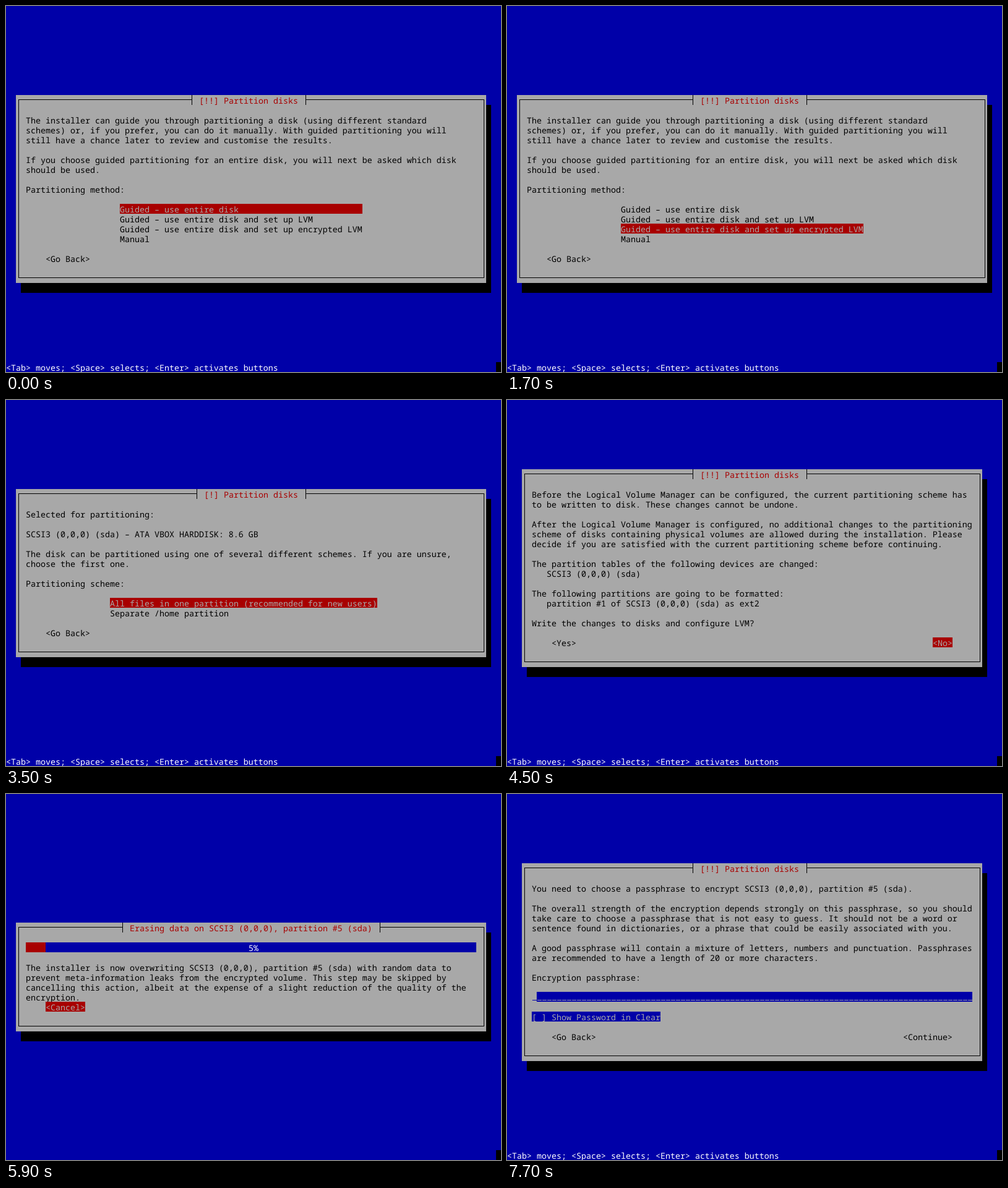
These frames come from a looping animation (800 px wide and 592 px high, 8000 ms). An HTML page:

```html
<!DOCTYPE html>
<html lang="en">
<head>
<meta charset="utf-8">
<title>Disk partitioning installer</title>
<style>
  html, body { margin: 0; width: 100%; height: 100%; overflow: hidden; background: #0000a8; }
  svg { display: block; width: 100vw; height: 100vh; }
  text {
    font: 300 13.3333px "Noto Sans Mono", "DejaVu Sans Mono", monospace;
    white-space: pre;
    font-variant-ligatures: none;
    text-rendering: geometricPrecision;
  }
</style>
</head>
<body>
<svg id="stage" viewBox="0 0 800 592" shape-rendering="crispEdges"></svg>
<script>
const LOOP = 8000;
const CELL = 8, ROW = 16;
const BLUE = '#0000a8', GRAY = '#a8a8a8', RED = '#a80000', BLACK = '#000', WHITE = '#fff';
const stage = document.getElementById('stage');

const escapeText = s => s.replace(/&/g, '&amp;').replace(/</g, '&lt;').replace(/>/g, '&gt;');
const rect = (x, y, w, h, fill) =>
  `<rect x="${x}" y="${y}" width="${w}" height="${h}" fill="${fill}"/>`;

// Text sits in an 8 x 16 character cell whose top left corner is x, y.
const label = (x, y, s, fill = BLACK) =>
  `<text x="${x}" y="${y + 14}" fill="${fill}">${escapeText(s)}</text>`;
const lines = (x, y, list) => list.map((s, i) => s && label(x, y + i * ROW, s)).join('');
const marked = (x, y, s, back = RED, width = s.length * CELL) =>
  rect(x, y, width, ROW, back) + label(x, y, s, GRAY);
const button = (x, y, s, active) => active ? marked(x, y, s) : label(x, y, s);

function dialog(x, y, w, h, title) {
  const left = x + 4, right = x + w - 4, top = y + 7, bottom = y + h - 9;
  const titleX = Math.floor((396 - title.length * 4) / CELL) * CELL;
  const teeL = titleX - 12, teeR = titleX + title.length * CELL + 12;
  return rect(x + 8, y + ROW, w, h, BLACK) + rect(x, y, w, h, GRAY) +
    rect(left, top, teeL - left, 1, BLACK) + rect(teeR, top, right - teeR + 1, 1, BLACK) +
    rect(left, bottom, right - left + 1, 1, BLACK) +
    rect(left, top, 1, bottom - top, BLACK) + rect(right, top, 1, bottom - top, BLACK) +
    rect(teeL, y, 1, ROW, BLACK) + rect(teeR, y, 1, ROW, BLACK) +
    label(titleX, y, title, RED);
}

function menu(x, y, items, chosen) {
  const width = Math.max(...items.map(s => s.length)) * CELL;
  return items.map((s, i) => i === chosen
    ? marked(x, y + i * ROW, s, RED, width)
    : label(x, y + i * ROW, s)).join('');
}

const help = () => label(0, 576, '<Tab> moves; <Space> selects; <Enter> activates buttons', WHITE);

const methodScreen = chosen => dialog(16, 144, 760, 304, '[!!] Partition disks') +
  lines(32, 176, [
    'The installer can guide you through partitioning a disk (using different standard',
    'schemes) or, if you prefer, you can do it manually. With guided partitioning you will',
    'still have a chance later to review and customise the results.',
    '',
    'If you choose guided partitioning for an entire disk, you will next be asked which disk',
    'should be used.',
    '',
    'Partitioning method:'
  ]) +
  menu(184, 320, [
    'Guided – use entire disk',
    'Guided – use entire disk and set up LVM',
    'Guided – use entire disk and set up encrypted LVM',
    'Manual'
  ], chosen) +
  button(64, 400, '<Go Back>') + help();

const diskScreen = () => dialog(16, 192, 760, 192, '[!!] Partition disks') +
  lines(32, 224, [
    'Note that all data on the disk you select will be erased, but not before you have',
    'confirmed that you really want to make the changes.',
    '',
    'Select disk to partition:'
  ]) +
  menu(200, 304, ['SCSI3 (0,0,0) (sda) – 8.6 GB ATA VBOX HARDDISK'], 0) +
  button(64, 336, '<Go Back>') + help();

const schemeScreen = () => dialog(16, 144, 760, 272, '[!] Partition disks') +
  lines(32, 176, [
    'Selected for partitioning:',
    '',
    'SCSI3 (0,0,0) (sda) – ATA VBOX HARDDISK: 8.6 GB',
    '',
    'The disk can be partitioned using one of several different schemes. If you are unsure,',
    'choose the first one.',
    '',
    'Partitioning scheme:'
  ]) +
  menu(168, 320, [
    'All files in one partition (recommended for new users)',
    'Separate /home partition'
  ], 0) +
  button(64, 368, '<Go Back>') + help();

const confirmScreen = yes => dialog(24, 112, 744, 320, '[!!] Partition disks') +
  lines(40, 144, [
    'Before the Logical Volume Manager can be configured, the current partitioning scheme has',
    'to be written to disk. These changes cannot be undone.',
    '',
    'After the Logical Volume Manager is configured, no additional changes to the partitioning',
    'scheme of disks containing physical volumes are allowed during the installation. Please',
    'decide if you are satisfied with the current partitioning scheme before continuing.',
    '',
    'The partition tables of the following devices are changed:',
    '   SCSI3 (0,0,0) (sda)',
    '',
    'The following partitions are going to be formatted:',
    '   partition #1 of SCSI3 (0,0,0) (sda) as ext2',
    '',
    'Write the changes to disks and configure LVM?'
  ]) +
  button(72, 384, '<Yes>', yes) + button(688, 384, '<No>', !yes) + help();

function eraseScreen(percent) {
  const cells = Math.floor(91 * percent / 100);
  return dialog(16, 208, 760, 176, 'Erasing data on SCSI3 (0,0,0), partition #5 (sda)') +
    rect(32, 240, 728, ROW, BLUE) + rect(32, 240, cells * CELL, ROW, RED) +
    label(percent < 10 ? 392 : 384, 240, percent + '%', WHITE) +
    lines(32, 272, [
      'The installer is now overwriting SCSI3 (0,0,0), partition #5 (sda) with random data to',
      'prevent meta-information leaks from the encrypted volume. This step may be skipped by',
      'cancelling this action, albeit at the expense of a slight reduction of the quality of the',
      'encryption.'
    ]) +
    button(64, 336, '<Cancel>', true);
}

const passphraseScreen = () => dialog(24, 112, 744, 320, '[!!] Partition disks') +
  lines(40, 144, [
    'You need to choose a passphrase to encrypt SCSI3 (0,0,0), partition #5 (sda).',
    '',
    'The overall strength of the encryption depends strongly on this passphrase, so you should',
    'take care to choose a passphrase that is not easy to guess. It should not be a word or',
    'sentence found in dictionaries, or a phrase that could be easily associated with you.',
    '',
    'A good passphrase will contain a mixture of letters, numbers and punctuation. Passphrases',
    'are recommended to have a length of 20 or more characters.',
    '',
    'Encryption passphrase:'
  ]) +
  rect(48, 320, 704, ROW, BLUE) + rect(41, 333, 7, 1, BLUE) +
  `<path d="M49 333.5H752" stroke="${GRAY}" stroke-dasharray="7 1"/>` +
  marked(40, 352, '[ ] Show Password in Clear', BLUE) +
  button(72, 384, '<Go Back>') + button(640, 384, '<Continue>') + help();

function screenAt(t) {
  if (t < 2500) return methodScreen(t < 1000 ? 0 : t < 1700 ? 1 : 2);
  if (t < 3500) return diskScreen();
  if (t < 4500) return schemeScreen();
  if (t < 5900) return confirmScreen(t >= 5100);
  if (t < 7700) {
    const step = Math.min(10, Math.floor((t - 5900) / 100));
    return eraseScreen(Math.round(5 + 9.4 * step));
  }
  return passphraseScreen();
}

let shown = '';
function render(t) {
  const next = rect(0, 0, 800, 592, BLUE) + rect(792, 576, 8, ROW, BLACK) + screenAt(t);
  if (next !== shown) stage.innerHTML = shown = next;
}

const start = performance.now();
function tick() {
  render((performance.now() - start) % LOOP);
  requestAnimationFrame(tick);
}
render(0);
requestAnimationFrame(tick);
</script>
</body>
</html>
```
